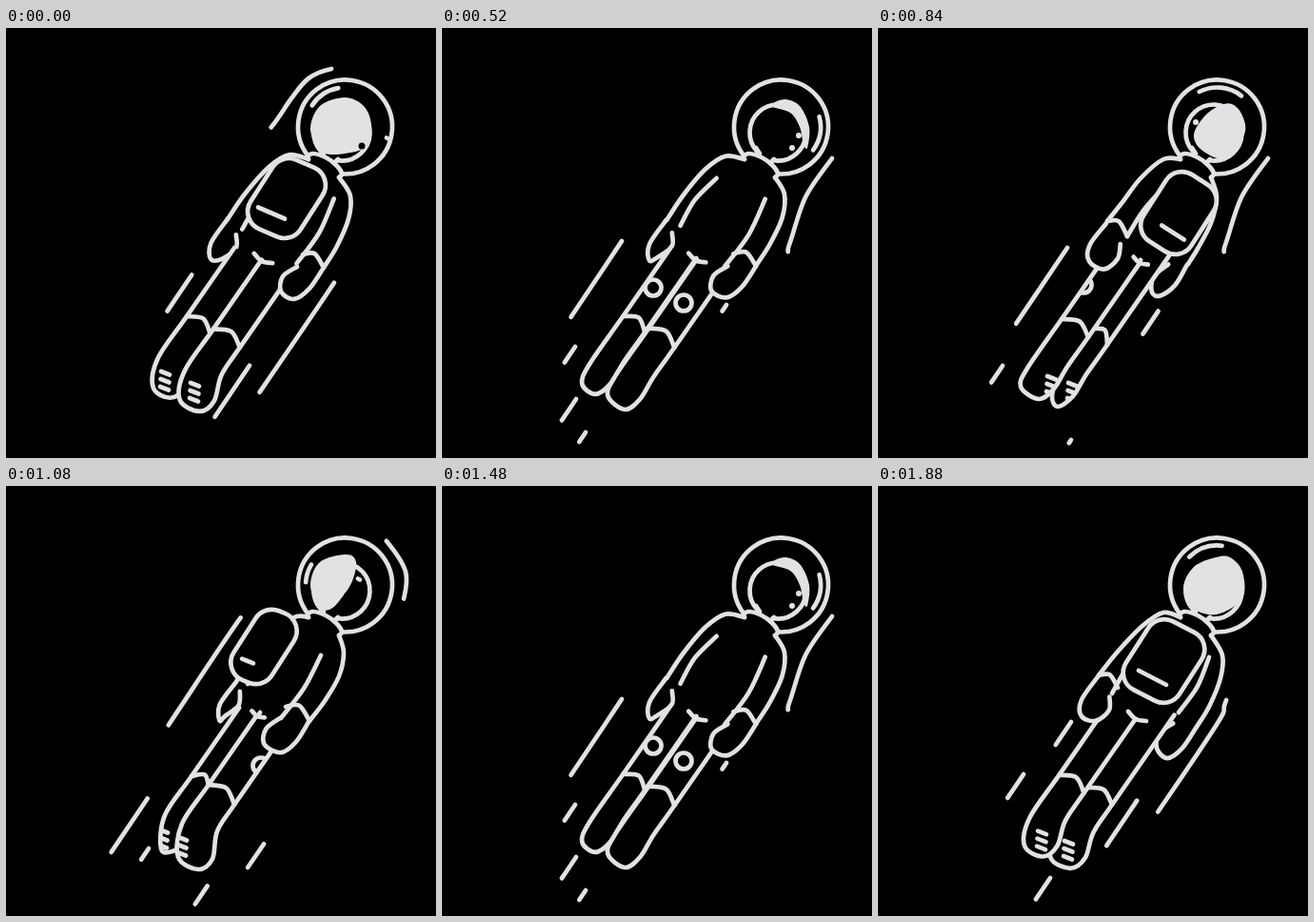
Animation, 452 px wide and 452 px high, one loop 1.92 s. Source, as an HTML page with a canvas:

```html
<!DOCTYPE html>
<html lang="en">
<head>
<meta charset="utf-8">
<title>Spinning astronaut</title>
<style>
  html, body { margin: 0; width: 100%; height: 100%; overflow: hidden; background: #000; }
  canvas { display: block; width: 452px; height: 452px; }
</style>
</head>
<body>
<canvas id="stage" width="452" height="452"></canvas>
<script>
const ctx = document.getElementById('stage').getContext('2d');
const INK = '#e2e2e4', BG = '#000', TURN = 960, HALF = TURN / 2, STEP = 40;

// Every track is a list of poses: [time, value, value, ...]
const shoulderL = [
  [20, 297,134, 276,147, 252,175, 235,201],
  [120, 303,138, 280,158, 260,182, 243,204],
  [280, 303,142, 288,162, 272,186, 257,208],
  [360, 300,138, 276,158, 257,183, 241,203],
  [440, 300,133, 278,147, 252,174, 232,199]];
const shoulderR = [
  [20, 361,175, 359,200, 346,229, 332,251],
  [120, 355,175, 350,200, 335,226, 319,247],
  [280, 349,178, 338,205, 318,232, 300,248],
  [360, 356,178, 350,205, 336,232, 326,248],
  [440, 362,178, 360,202, 348,232, 335,253]];

// Right end, left end
const wrist = [
  [20, 332,251, 309,238], [120, 319,247, 294,232], [280, 279,229, 257,208],
  [360, 262,219, 241,203], [440, 252,212, 232,199], [500, 251,206, 235,201],
  [600, 254,207, 243,204], [840, 326,248, 310,238], [920, 335,253, 316,237]];
const cuff = [
  [20, 245,336, 218,316], [120, 240,335, 213,314], [280, 228,330, 200,309],
  [360, 221,325, 193,306], [500, 214,321, 190,303], [600, 213,316, 195,305],
  [760, 236,334, 222,315], [840, 241,333, 226,316], [920, 246,335, 218,317]];
// Top, bottom
const sleeve = [
  [20, 342,180, 300,251], [120, 331,178, 289,244], [280, 321,168, 276,235],
  [360, 300,168, 262,219], [440, 290,160, 246,218], [500, 292,156, 250,209],
  [600, 275,170, 254,208], [840, 335,200, 308,240], [920, 348,180, 316,238]];
// Middle, size
const crotch = [
  [20, 268,245, 1], [120, 264,242, .7], [280, 283,250, .2], [360, 275,247, .8], [440, 271,245, 1]];

// Offsets from the right end (first three / two) and from the left end (the rest)
const gloveRight = [0,0, -15,22, -31,33, -23,39, -21,23, -6,13];
const gloveLeft = [-9,10, -9,24, -23,35, -18,43, -18,26, 0,0];
const bootBent = [-18,28, -23,57, -38,68, -32,76, -28,41];
const bootStraight = [-22,31, -36,54, -52,65, -43,71, -35,50];
const straightness = [[0, .3], [120, 0], [280, .1], [520, 1], [840, 1], [920, .4]];

const knees = [
  [[120, 268,294], [280, 247,285], [520, 222,273], [640, 204,262]],
  [[240, 270,300], [280, 259,294], [520, 254,289], [840, 216,270]]];
const treads = [
  [[760, 206,374], [840, 200,373], [960, 194,373], [1080, 181,369], [1160, 170,366]],
  [[760, 188,368], [840, 178,366], [960, 163,361], [1080, 161,361], [1160, 152,361]]];

// Centre, half width vector
const pack = [
  [0, 295,179, 28,12], [120, 271,169, 22,9], [280, 272,168, 20.5,11.5], [520, 302,184, 25,13],
  [720, 330,202, 20,11], [840, 316,194.5, 25,16], [920, 300.5,184, 29,15]];
// Sideways shift, length
const pocket = [[720, 9,.1], [840, 5,.47], [920, -1,.5], [960, -5,.5], [1080, -6,.27], [1180, -8,.1]];

const hair = [
  [520, 380,122, 376,104, 366,89, 346,82, 360,75, 376,82, 386,104, 384,126],
  [840, 340,128, 332,112, 343,93, 358,82, 372,80, 383,92, 385,112, 364,137],
  [920, 330,128, 321,107, 332,85, 355,75, 370,75, 383,90, 383,118, 356,135],
  [960, 330,128, 320,106, 330,82, 356,73, 376,82, 384,102, 379,125, 347,133],
  [1080, 329,128, 320,104, 330,80, 358,72, 368,80, 364,100, 354,116, 342,129],
  [1240, 329,128, 320,104, 330,80, 356,72, 371,85, 355,86, 346,98, 344,120],
  [1360, 325,122, 322,106, 330,86, 356,74, 372,82, 350,83, 334,92, 327,116]];
const ear = [[960, 374,124], [1080, 359,115], [1240, 344,105], [1320, 335,103]];
const eye = [[1060, 376,101], [1080, 371,98], [1240, 359,90], [1360, 345,88]];
const nose = [[480, 378,115], [520, 375,113], [840, 334,99]];
const chin = [[480, 373,127], [520, 368,126], [640, 350,127]];
const glint = [
  [520, -15,36], [840, -117,-52], [920, -135,-83], [960, -147,-100],
  [1080, -176,-149], [1240, -290,-286], [1480, -375,-324]];

// Wind streaks: a path and [time, tail, head] measured along it
const sweepL = [367,43, 342,43, 318,53, 300,74, 279,104, 247,138, 171,251, 118,330];
const sweepR = [410,137, 382,178, 365,228, 352,257, 250,407];
const arcR = [385,48, 400,58, 420,90, 418,119, 410,137, 382,178, 361,213, 287,328];
const laneR = [299,291, 187,457], laneL = [203,248, 91,414];
const sweepRun = [[780, 0,0], [840, 0,110], [920, 99,238], [960, 148,287], [1080, 279,309], [1120, 312,312]];
const sweepLRun1 = [[924, 0,0], [960, 25,116], [1080, 163,299], [1240, 331,361], [1300, 390,390]];
const sweepLRun2 = [[240, 0,0], [280, 0,71], [360, 116,200], [520, 266,362], [640, 390,390]];
const arcRun = [[60, 0,0], [120, 18,85], [200, 85,250], [280, 195,332], [340, 332,332]];
const laneRRun = [[800, 0,0], [840, 8,37], [920, 48,105], [960, 77,142], [1080, 156,179], [1120, 179,179]];
const laneLRun = [[900, 0,0], [920, 0,29], [960, 14,60], [1080, 97,165], [1160, 170,170]];
// Short dashes: [time, x, y, length, lifetime]
const puffs = [
  [120, 150,381, 14, 60], [280, 223,211, 29, 70], [280, 128,416, 4, 60],
  [520, 140,335, 20, 60], [520, 141,390, 27, 60], [520, 151,425, 12, 50], [520, 299,291, 8, 40],
  [840, 199,231, 96, 75], [840, 131,355, 21, 60], [840, 203,433, 4, 40],
  [920, 153,303, 30, 46], [920, 181,412, 27, 75]];

// Smooth cyclic interpolation
function cycle(track, time, period = TURN) {
  const n = track.length, t = time % period;
  const key = i => {
    const wrap = Math.floor(i / n), pose = track[i - wrap * n];
    return { t: pose[0] + wrap * period, v: pose };
  };
  let i = n - 1;
  while (i >= 0 && track[i][0] > t) i--;
  const [p, a, b, q] = [key(i - 1), key(i), key(i + 1), key(i + 2)];
  const span = b.t - a.t, s = (t - a.t) / span;
  return a.v.slice(1).map((va, j) => {
    const vb = b.v[j + 1];
    const ma = (vb - p.v[j + 1]) / (b.t - p.t) * span;
    const mb = (q.v[j + 1] - va) / (q.t - a.t) * span;
    return va + s * (ma + s * (3 * (vb - va) - 2 * ma - mb + s * (2 * (va - vb) + ma + mb)));
  });
}

// Linear run with a beginning and an end; null outside it
function run(track, time) {
  const first = track[0][0], last = track[track.length - 1][0];
  const t = time < first ? time + TURN : time;
  if (t > last) return null;
  const i = Math.max(1, track.findIndex(k => k[0] >= t));
  const a = track[i - 1], b = track[i], s = (t - a[0]) / (b[0] - a[0]);
  return a.slice(1).map((v, j) => v + (b[j + 1] - v) * s);
}

const mix = (a, b, s) => a.map((v, i) => v + (b[i] - v) * s);
const wave = phase => Math.cos((phase - 20) / TURN * 2 * Math.PI);

// Adds offsets to the right end for the first points, to the left end after
const hang = (offsets, [rx, ry, lx, ly]) =>
  offsets.map((v, i) => v + (i < 6 ? [rx, ry] : [lx, ly])[i % 2]);

function spline(p, closed = false) {
  const n = p.length / 2, path = new Path2D();
  const at = i => {
    const k = closed ? (i + n) % n : Math.min(n - 1, Math.max(0, i));
    return [p[2 * k], p[2 * k + 1]];
  };
  path.moveTo(p[0], p[1]);
  for (let i = 0; i < (closed ? n : n - 1); i++) {
    const [a, b, c, d] = [at(i - 1), at(i), at(i + 1), at(i + 2)];
    path.bezierCurveTo(b[0] + (c[0] - a[0]) / 6, b[1] + (c[1] - a[1]) / 6,
      c[0] - (d[0] - b[0]) / 6, c[1] - (d[1] - b[1]) / 6, c[0], c[1]);
  }
  return path;
}

const stroke = p => ctx.stroke(spline(p));
function fill(path, color = BG) { ctx.fillStyle = color; ctx.fill(path); }
function solid(p) {
  const path = spline(p);
  fill(path);
  ctx.stroke(path);
}
function dot(at, r, color) {
  if (!at) return;
  const path = new Path2D();
  path.arc(...at, r, 0, 7);
  fill(path, color);
}
function ring(x, y, r, from, to) {
  const rad = Math.PI / 180;
  ctx.beginPath();
  ctx.arc(x, y, r, from * rad, to * rad);
  ctx.stroke();
}

function streak(path, keys, t) {
  const span = run(keys, t);
  if (!span || span[1] - span[0] < 1) return;
  ctx.setLineDash([span[1] - span[0], 2000]);
  ctx.lineDashOffset = -span[0];
  stroke(path);
  ctx.setLineDash([]);
}

function drawWind(t) {
  streak(sweepL, sweepLRun1, t);
  streak(sweepL, sweepLRun2, t);
  streak(sweepR, sweepRun, t);
  streak(sweepR, sweepRun, (t + 320) % TURN);
  streak(arcR, arcRun, t);
  streak(laneR, laneRRun, t);
  streak(laneL, laneLRun, t);
  for (const [time, x, y, length, life] of puffs) {
    const age = t - time;
    if (Math.abs(age) >= life) continue;
    const half = length / 2 * (1 - (age / life) ** 2), mid = length / 2 + age * .4;
    const at = d => [x + d * .56, y + d * .83].map((v, i) => i ? v : 2 * x - v);
    stroke([...at(mid - half), ...at(mid + half)]);
  }
}

function drawPack(t) {
  const [x, y, wx, wy] = cycle(pack, t), path = new Path2D();
  const corner = (a, b) => [x + a * wx + b * 22.5, y + a * wy - b * 35];
  const corners = [corner(-1, 1), corner(1, 1), corner(1, -1), corner(-1, -1)];
  path.moveTo(...corner(-1, 0));
  corners.forEach((c, i) => path.arcTo(...c, ...corners[(i + 1) % 4], 20));
  path.closePath();
  fill(path);
  ctx.stroke(path);
  const line = run(pocket, t);
  if (!line) return;
  const [shift, size] = line, px = x - 11 + shift, py = y + 18 + shift * .5;
  stroke([px - wx * size, py - wy * size, px + wx * size, py + wy * size]);
}

function drawGlove(phase) {
  const ends = cycle(wrist, phase), [rx, ry, lx, ly] = ends;
  const width = Math.hypot(rx - lx, ry - ly);
  solid(hang(mix(gloveLeft, gloveRight, (1 + wave(phase)) / 2), ends));
  solid([rx, ry, (rx + lx) / 2 + width * .06, (ry + ly) / 2 - width * .3, lx, ly]);
}

function drawSleeve(phase) {
  const [x1, y1, x2, y2] = cycle(sleeve, phase), bend = wave(phase);
  stroke([x1, y1, (x1 + x2) / 2 + 4 * bend, (y1 + y2) / 2 + 2 * bend, x2, y2]);
}

function drawLeg({ side, phase }, t, isFar) {
  const ends = cycle(cuff, phase), [rx, ry, lx, ly] = ends;
  const inner = 88, outer = isFar && wave(phase) > 0 ? 115 : 95;
  const [straight] = cycle(straightness, t);
  // The boot has two points below the right end of the cuff, a toe, and two on the left
  const foot = hang(mix(bootBent, bootStraight, straight), ends);
  const outline = spline([rx + outer * .57, ry - outer * .82, rx, ry, ...foot,
    lx, ly, lx + inner * .57, ly - inner * .82]);
  fill(outline);
  ctx.save();
  ctx.clip(outline);
  const knee = run(knees[side], t), tread = run(treads[side], t);
  if (knee) ring(...knee, 8.5, 0, 360);
  for (let i = 0; tread && i < 3; i++) {
    const x = tread[0] - i * .5, y = tread[1] + i * 8;
    stroke([x, y, x + 9, y + 3.5]);
  }
  ctx.restore();
  ctx.stroke(outline);
  stroke([lx, ly, (lx + rx) / 2 + 5, (ly + ry) / 2 - 7, rx, ry]);
}

function drawHead(t) {
  ring(356.5, 104, 49.5, 143, 454);
  ring(353, 110, 29.5, 138, 460);
  stroke([330,126, 334,132]);
  stroke([349,138, 345,142]);
  fill(spline(run(hair, t) || hair[0].slice(1), true), INK);
  dot(run(ear, t), 3.5, BG);
  dot(run(nose, t), 3, INK);
  dot(run(chin, t), 3, INK);
  const look = run(eye, t);
  if (look) stroke([look[0] - 1, look[1] - .5, look[0] + 1, look[1] + .5]);
  ring(356.5, 104, 41.5, ...run(glint, t));
  stroke([318,138, 317,135, 323,132, 336,136, 347,144, 353,153, 350,157]);
}

function draw(t) {
  fill(new Path2D('M0 0H452V452H0Z'));
  ctx.strokeStyle = INK;
  ctx.lineWidth = 4.7;
  ctx.lineCap = ctx.lineJoin = 'round';

  const sides = [{ side: 0, phase: t }, { side: 1, phase: (t + HALF) % TURN }];
  const [near, far] = t < 460 || t >= 940 ? sides : sides.reverse();
  const packBehind = t >= 230 && t < 700;
  const left = [318, 138, ...cycle(shoulderL, t, HALF)];
  const right = [350, 157, ...cycle(shoulderR, t, HALF)];

  drawWind(t);
  drawGlove(far.phase);
  if (packBehind) drawPack(t);

  const body = [...left];
  for (let i = right.length - 2; i >= 0; i -= 2) body.push(right[i], right[i + 1]);
  fill(spline(body));
  drawLeg(far, t, true);
  drawLeg(near, t, false);
  const [cx, cy, size] = cycle(crotch, t, HALF);
  stroke([cx - 8 * size, cy - 8 * size, cx, cy, cx + 11 * size, cy + 2 * size]);
  stroke(left);
  stroke(right);

  if (far.phase < 620 || far.phase > 880) drawSleeve(far.phase);
  drawGlove(near.phase);
  drawSleeve(near.phase);
  if (!packBehind) drawPack(t);
  drawHead(t);
}

const start = performance.now();
function tick() {
  const t = performance.now() - start;
  draw(Math.floor(t / STEP) * STEP % TURN);
  requestAnimationFrame(tick);
}
tick();
</script>
</body>
</html>
```
